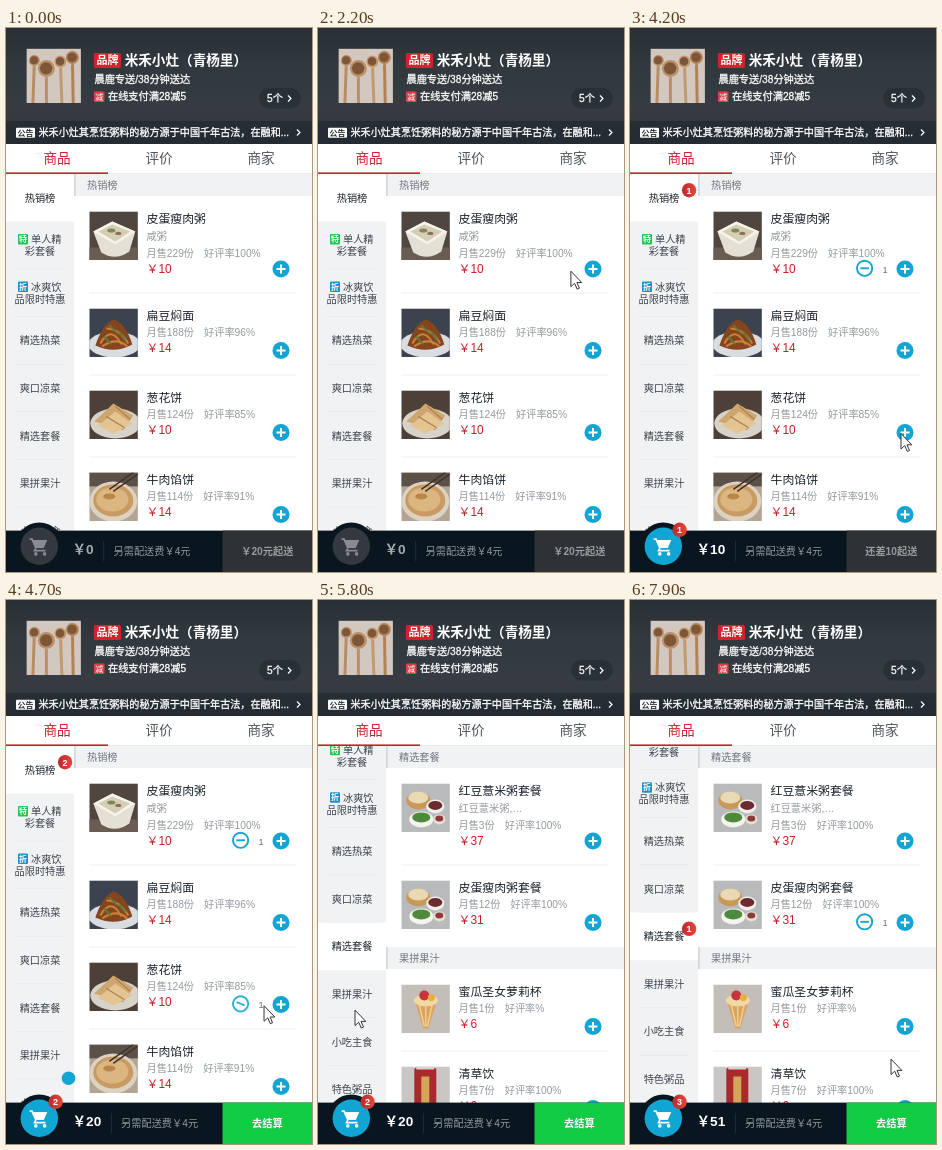
These frames come from a looping animation (306 px wide and 544 px high, 8 s). An HTML page:

```html
<!DOCTYPE html>
<html lang="zh-CN">
<head>
<meta charset="utf-8">
<style>
html, body { margin: 0; width: 100%; height: 100%; overflow: hidden; background: #fff }
svg { display: block; width: 306px; height: 544px; font-family: "Liberation Sans", "Noto Sans CJK SC", "Noto Sans CJK", sans-serif }
svg svg { width: auto; height: auto }
</style>
</head>
<body>
<svg id="stage" viewBox="0 0 306 544"></svg>
<script>
const BLUE = '#10a5d2', GREY = '#93999f', RED = '#c9202b';
const S = 10.2, TOP = 146, BAR = 22.1, ROW = 47.6;

// Drawing helpers; text y is the vertical centre of the glyphs
const rect = (x, y, w, h, fill, extra = '') => `<rect x="${x}" y="${y}" width="${w}" height="${h}" fill="${fill}" ${extra}/>`;
const oval = (x, y, rx, ry, fill, extra = '') => `<ellipse cx="${x}" cy="${y}" rx="${rx}" ry="${ry}" fill="${fill}" ${extra}/>`;
const disc = (x, y, r, fill, extra) => oval(x, y, r, r, fill, extra);
const path = (d, fill, extra = '') => `<path d="${d}" fill="${fill}" ${extra}/>`;
const line = (d, color, width, extra = '') => path(d, 'none', `stroke="${color}" stroke-width="${width}" ${extra}`);
const text = (x, y, size, fill, str, extra = '') => `<text x="${x}" y="${y + size * .37}" font-size="${size}" fill="${fill}" ${extra}>${str}</text>`;
const group = (x, y, inner, extra = '') => `<g transform="translate(${x} ${y})" ${extra}>${inner}</g>`;
const picture = (x, y, size, inner) => group(x, y, `<svg width="${size}" height="${size}" style="width:${size}px;height:${size}px">${inner}</svg>`);
const BOLD = 'font-weight="700"', SEMI = 'stroke="#fff" stroke-width=".3"', MID = 'text-anchor="middle"';

const clamp = v => Math.max(0, Math.min(1, v));
const easeOut = p => 1 - (1 - p) ** 2;
const span = (t, a, b) => clamp((t - a) / (b - a));

// Simplified dish pictures on a 48.5 px square
const combo = rect(0, 0, 49, 49, '#b9babb') + oval(17, 17, 12, 9, '#c79a5c') + oval(17, 14, 10, 6, '#ead9b5') +
  oval(34, 23, 9, 7, '#f2f0ec') + oval(34, 22, 7, 4.5, '#6d2b30') + oval(20, 36, 12, 8, '#f4f3ef') +
  oval(20, 34, 9, 5, '#4d8a3c') + oval(38, 36, 6, 5, '#e4e0d8') + oval(38, 35, 4, 3, '#8e3a3a');
const dishes = [
  rect(0, 0, 49, 49, '#4f463f') + rect(0, 36, 49, 13, '#6a5c50') + path('M4 20L23 10L46 20L40 40Q26 50 12 41Z', '#e4e0d6') +
    path('M4 20L23 10L46 20L26 33Z', '#f6f3ea') + path('M9 20L23 13L41 20L26 30Z', '#d5ceb4') +
    oval(22, 19, 4, 2, '#7c8a60') + oval(29, 22, 3, 1.6, '#8a6f5c'),
  rect(0, 0, 49, 49, '#3c434e') + oval(25, 36, 26, 13, '#d9dde2') + path('M6 37Q14 14 25 11Q37 16 43 36Q25 46 6 37Z', '#84451f') +
    line('M11 35Q22 16 32 36M17 20Q30 20 39 35M13 38Q27 28 38 38', '#c9803a', 2) + line('M20 17l8 8M30 24l6 8M15 28l7 8', '#5d7a3a', 2),
  rect(0, 0, 49, 49, '#4c4039') + oval(26, 33, 25, 15, '#d8d3c9') + path('M5 31L24 13L44 25L34 40Z', '#cfa670') +
    path('M9 35L26 21L43 33L24 43Z', '#e4c491') + line('M17 26L35 37M26 16L41 29', '#a97f4b', 1.2),
  rect(0, 0, 49, 49, '#b3a493') + rect(0, 0, 49, 14, '#5c5149') + oval(24, 29, 24, 20, '#ddd2c0') + oval(24, 28, 20, 16, '#c99b62') +
    oval(23, 27, 16, 12, '#dcb680') + oval(20, 24, 6, 3, '#b98549') + line('M48 2L24 19M44 0L20 17', '#3f332c', 1.6),
  combo,
  combo,
  rect(0, 0, 49, 49, '#c3beb8') + path('M13 15H36L27 44H22Z', '#dba35d') + oval(24.5, 16, 12, 6, '#f0d9a5') +
    line('M18 20L23 42M31 20L26 42M24.5 20V42', '#f1cf94', 1.5) + disc(23, 11, 5, '#c8343a') + disc(30, 13, 3.5, '#e3b13c'),
  rect(0, 0, 49, 49, '#c9c6c3') + rect(13, 1, 22, 60, '#a92a2c', 'rx="3"') + rect(15, 0, 18, 3, '#d5d2cd') + rect(20, 10, 8, 28, '#d3a659')
];

// name, description, sold, rating, price, picture, time of adding
const menu = [
  ['热销榜',
    ['皮蛋瘦肉粥', '咸粥', 229, 100, 10, 0, 2850], ['扁豆焖面', '', 188, 96, 14, 1], ['葱花饼', '', 124, 85, 10, 2, 4350],
    ['牛肉馅饼', '', 114, 91, 14, 3], ['南瓜粥', '甜粥', 91, 100, 9, 0], ['糊塌子', '', 80, 93, 10, 2]],
  ['单人精,彩套餐', ['红枣山药粥套餐', '', 17, 100, 29, 4]],
  ['冰爽饮,品限时特惠', ['鲜橙果汁', '', 15, 100, 8, 6]],
  ['精选热菜', ['娃娃菜炖豆腐', '', 43, 92, 17, 1], ['手撕包菜', '', 29, 100, 16, 1]],
  ['爽口凉菜', ['八宝酱菜', '', 84, 100, 4, 1], ['拍黄瓜', '', 28, 100, 9, 0]],
  ['精选套餐', ['红豆薏米粥套餐', '红豆薏米粥,…', 3, 100, 37, 4], ['皮蛋瘦肉粥套餐', '', 12, 100, 31, 5, 6900]],
  ['果拼果汁', ['蜜瓜圣女萝莉杯', '', 1, '', 6, 6], ['清草饮', '', 7, 100, 6, 7]],
  ['小吃主食'],
  ['特色粥品']
];
const pitch = food => food[1] ? 97 : 82;
const starts = [];
menu.reduce((y, [, ...foods]) => {
  starts.push(y);
  return foods.reduce((sum, food) => sum + pitch(food), y + BAR);
}, 0);

const orders = [[2850, 241, 10], [4350, 404, 10], [6900, 323, 31]]; // time, button y, price

const badge = (x, y, n) => disc(x, y, 7.2, 'url(#badge)') + text(x, y, 9, '#fff', n, BOLD + MID);
const chevron = (x, y) => line(`M${x} ${y - 3}l3 3l-3 3`, '#fff', 1.2);

function control(y, added, t) {
  let out = disc(275, y, 8.5, BLUE) + line(`M270.5 ${y}h9M275 ${y - 4.5}v9`, '#fff', 2);
  if (t > added) {
    const p = span(t, added, added + 400);
    const minus = disc(0, 0, 7.6, 'none', `stroke="${BLUE}" stroke-width="1.9"`) + line('M-4.3 0h8.6', BLUE, 1.9);
    out += group(234.6, y - .6, `<g transform="rotate(${180 * (1 - p)})">${minus}</g>`, `opacity="${p}"`);
    out += text(255, y + .3, 9.2, '#666c72', 1, MID);
  }
  return out;
}

function foodRow([name, desc, sold, rate, price, dish, added], y, t) {
  const shift = desc ? 17.5 : 0;
  return picture(83.3, y, 48.5, dishes[dish]) +
    text(140.5, y + 7, 11.9, '#1b242d', name) +
    (desc ? text(140.5, y + 25.3, S, GREY, desc) : '') +
    text(140.5, y + 24 + shift, S, GREY, `月售${sold}份<tspan dx="10">好评率${rate}%</tspan>`) +
    text(140.5, y + 39.2 + shift, 11.9, RED, '￥' + price) +
    control(y + 42 + (desc ? 15.5 : 0), added, t);
}

function foodList(scroll, t) {
  let out = rect(68, TOP, 238, 358, '#fff');
  menu.forEach(([title, ...foods], i) => {
    let y = TOP + starts[i] - scroll;
    out += rect(68, y, 238, BAR, '#f0f2f4') + rect(68, y, 1.7, BAR, '#d3d8dc') + text(81, y + 10.8, S, '#70777e', title.replace(',', ''));
    y += BAR;
    foods.forEach((food, k) => {
      if (y > 0 && y < 510) {
        out += foodRow(food, y + 15.3, t);
        if (k < foods.length - 1) out += rect(83.3, y + pitch(food) - .5, 207, .8, '#eaebec');
      }
      y += pitch(food);
    });
  });
  return out;
}

function sideMenu(scroll, active, t) {
  let out = rect(0, TOP, 68, 358, '#f0f2f4');
  menu.forEach(([title, ...foods], i) => {
    const y = TOP + i * ROW - scroll, mid = y + ROW / 2 + .1;
    const [first, second] = title.split(',');
    out += i === active ? rect(0, y, 68, ROW, '#fff') : rect(10, y + ROW - .5, 48, .6, '#e4e7e9');
    if (second) {
      const [mark, color] = i === 1 ? ['特', '#1fc64c'] : ['折', '#1c93cf'];
      out += rect(12, mid - 11.5, 10, 10.5, color, 'rx="1"') + text(17, mid - 6.3, 8, '#fff', mark, BOLD + MID) +
        text(25, mid - 6, S, '#3c444b', first) + text(34, mid + 6, S, '#3c444b', second, MID);
    } else {
      out += text(34, mid, S, i === active ? '#1b242d' : '#3c444b', first, MID);
    }
    const n = foods.filter(food => t > food[6]).length;
    if (n) out += badge(59.1, y + 16.2, n);
  });
  return out;
}

const spoon = (x, y, r, color, tilt) => group(x, y, `<g transform="rotate(${tilt})">` +
  rect(-1.5, r, 3, 50, color) + disc(0, 0, r, color) + disc(-.3, -.3, r * .72, '#7d5637') + '</g>');
const gradient = (id, dir, ...colors) => `<linearGradient id="${id}" ${dir}>` +
  colors.map((c, i) => `<stop offset="${i / (colors.length - 1)}" stop-color="${c}"/>`).join('') + '</linearGradient>';

const header = '<defs>' + gradient('shade', 'x2="0" y2="1"', '#283036', '#31383e', '#363c41', '#30363b') +
  gradient('badge', '', '#bd2a2c', '#e2473a') + '</defs>' +
  rect(0, 0, 306, 116, 'url(#shade)') +
  picture(20.4, 20.6, 54.5, rect(0, 0, 55, 55, '#d3c8bf') + spoon(8, 12, 5.5, '#b88d66', 2) +
    spoon(34, 13, 6, '#c39a70', -2) + spoon(46, 9, 6.5, '#b28256', -1) + spoon(20, 20, 8.5, '#bb9069', 0)) +
  rect(88, 25, 27, 15, '#d3222b', 'rx="1.5"') + text(101.5, 32.2, 11, '#fff', '品牌', BOLD + MID) +
  text(118.7, 32, 13.6, '#fff', '米禾小灶（青杨里）', BOLD) +
  text(88.5, 51.2, S, '#f2f3f3', '晨鹿专送/38分钟送达', SEMI) +
  rect(88, 63.5, 10.5, 10.5, '#d9404a', 'rx="1"') + text(93.2, 68.7, 8, '#fff', '减', MID) +
  text(102, 68.6, S, '#fff', '在线支付满28减5', SEMI) +
  rect(253, 60, 42, 20.5, '#07111b', 'rx="10" opacity=".25"') + text(261, 70.3, S, '#fff', '5个', SEMI) + chevron(282, 70.5) +
  rect(0, 93, 306, 23, '#07111b', 'opacity=".3"') +
  rect(10, 99.7, 19, 10, '#fff', 'rx="1"') + text(19.5, 104.7, 8, '#30363c', '公告', BOLD + MID) +
  text(32.5, 104.2, 10.1, '#fff', '米禾小灶其烹饪粥料的秘方源于中国千年古法，在融和...', SEMI) + chevron(291, 104.5) +
  rect(0, 116, 306, 30, '#fff') + rect(0, 145.2, 306, .8, '#e3e5e7') + rect(0, 144.4, 102, 1.6, RED) +
  ['商品', '评价', '商家'].map((s, i) => text(51 + 102 * i, 130.1, 13.6, i ? '#4d555d' : RED, s, MID)).join('');

function cartBar(t) {
  const done = orders.filter(o => t > o[0]), n = done.length;
  const total = done.reduce((sum, o) => sum + o[2], 0);
  const edge = 76.2 + 13.6 + 7.56 * String(total).length;
  const ready = total >= 20, icon = n ? '#fff' : '#888c90';
  const label = ready ? '去结算' : n ? `还差${20 - total}起送` : '￥20元起送';
  return rect(0, 502.6, 306, 42, '#09151f') + disc(33.3, 518.3, 23.8, '#09151f') + disc(33.3, 518.3, 18.7, n ? BLUE : '#33393e') +
    group(22.8, 508.6, path('M1 2h3.3l1 2H21l-4 9H9l-1 2h11v2H5l2-4L3 4H1z', icon, 'transform="scale(.88)"') +
      disc(7, 17.3, 1.8, icon) + disc(15.8, 17.3, 1.8, icon)) +
    (n ? badge(49.6, 501.8, n) : '') +
    text(66.5, 521.1, 13.6, n ? '#fff' : '#a5a9ad', '￥' + total, BOLD) +
    rect(edge, 513, .8, 20, '#27323b') + text(edge + S, 523.3, S, '#939a9f', '另需配送费￥4元') +
    rect(216.5, 502.6, 90, 42, ready ? '#12cb45' : '#2f3234') +
    text(261.3, 523.3, S, ready ? '#fff' : '#999c9e', label, BOLD + MID);
}

// Vertical easing of the thrown ball: cubic-bezier(.49, -.29, .75, .41)
function toss(x) {
  const curve = (a, b, s) => 3 * a * s * (1 - s) ** 2 + 3 * b * s * s * (1 - s) + s ** 3;
  let lo = 0, hi = 1;
  for (let i = 0; i < 20; i++) {
    const s = (lo + hi) / 2;
    if (curve(.49, .75, s) < x) lo = s; else hi = s;
  }
  return curve(-.29, .41, lo);
}

const balls = t => orders.filter(([at]) => t > at && t < at + 400).map(([at, y]) => {
  const p = (t - at) / 400, y0 = y - 21.6;
  return disc(267.2 - 233.9 * p, y0 + (518.3 - y0) * toss(p), 6.8, BLUE);
}).join('');

// time, x, y
const trail = [[1000, 114, 254], [1600, 114, 254], [2400, 278, 240.6], [3400, 278, 240.6], [4000, 270.5, 405], [4600, 270.5, 405],
  [5300, 36.5, 409.6], [6150, 36.5, 409.6], [6700, 277, 327], [7200, 277, 327], [7700, 260.5, 458.6], [8000, 260.5, 458.6]];

function cursor(t) {
  const i = trail.findIndex(k => k[0] > t);
  if (i < 1) return '';
  const [t0, x0, y0] = trail[i - 1], [t1, x1, y1] = trail[i];
  const p = span(t, t0, t1), e = p * p * (3 - 2 * p);
  return group(x0 + (x1 - x0) * e, y0 + (y1 - y0) * e,
    path('M.5 .5V16L4.2 12.6L6.8 18.5L9 17.5L6.5 11.8H11.3Z', '#fff', 'stroke="#333" stroke-width="1"'));
}

function draw(t) {
  const scroll = starts[5] * easeOut(span(t, 5450, 5780));
  const active = starts.filter(y => y <= scroll + 1).length - 1;
  const side = (menu.length * ROW - 357) * easeOut(span(t, 5550, 5950));
  return rect(0, 0, 306, 544, '#fff') + foodList(scroll, t) + sideMenu(side, active, t) + header + cartBar(t) + balls(t) + cursor(t);
}

const stage = document.getElementById('stage'), begin = performance.now();
let shown = -1;
function tick() {
  // The picture advances ten times a second
  const t = Math.floor((performance.now() - begin) % 8000 / 100) * 100;
  if (t !== shown) stage.innerHTML = draw(shown = t);
  requestAnimationFrame(tick);
}
tick();
</script>
</body>
</html>
```
